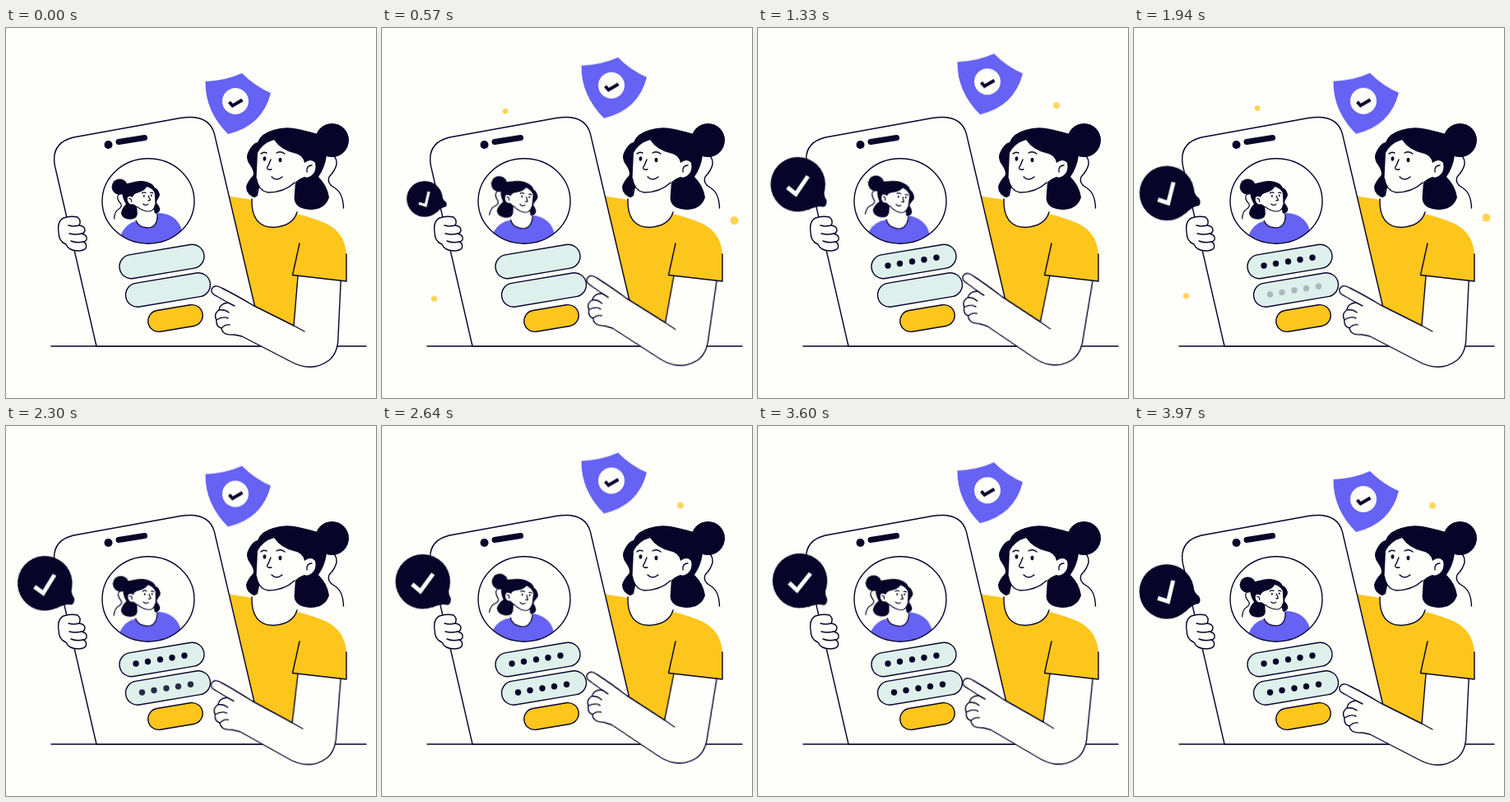
These frames come from a looping animation (450 by 450 pixels, 4000 ms). An HTML page:

```html
<!DOCTYPE html>
<html lang="en">
<head>
<meta charset="utf-8">
<title>Secure sign-in</title>
<style>
  :root {
    --paper: #fefefa; --ink: #060428; --sun: #fcc61c; --violet: #6562f4; --mint: #def0ec;
    --sine: cubic-bezier(.37, 0, .63, 1);
  }
  html, body { margin: 0; width: 100%; height: 100%; overflow: hidden; background: var(--paper); }
  svg { display: block; width: 100%; height: 100%; }
  .line { stroke: var(--ink); stroke-width: var(--weight, 1.4); stroke-linecap: round; stroke-linejoin: round; fill: none; }
  .paper { fill: var(--paper); }
  .ink { fill: var(--ink); }
  .sun { fill: var(--sun); }
  .violet { fill: var(--violet); }

  .shield { animation: lift 1s var(--sine) infinite alternate; }
  .arm { transform-origin: 385px 304px; animation: tap 1s var(--sine) infinite alternate; }
  .avatar { transform-origin: 165px 222px; animation: tilt 1s var(--sine) infinite alternate; }
  .bubble { transform-origin: 75px 220px; animation: bubble 4s var(--sine) infinite; }
  .row1 { animation: row1 4s linear infinite; }
  .row2 { animation: row2 4s linear infinite; }
  .early, .late { animation: early 1.33333s linear infinite; }
  .late { animation-name: late; }

  @keyframes lift { to { transform: translateY(-31.5px); } }
  @keyframes tap { to { transform: rotate(9deg); } }
  @keyframes tilt { to { transform: rotate(13deg); } }
  @keyframes bubble {
    0% { transform: rotate(0deg) scale(0); animation-timing-function: linear; }
    21.75%, 25%, 50%, 75%, 100% { transform: rotate(0deg) scale(1); }
    37.5%, 62.5%, 87.5% { transform: rotate(28deg) scale(1); }
  }
  @keyframes row1 { 0%, 16.7% { opacity: 0; } 33.3%, 100% { opacity: 1; } }
  @keyframes row2 { 0%, 45% { opacity: 0; } 60%, 100% { opacity: 1; } }
  @keyframes early {
    0% { transform: translateY(55px); opacity: 0; }
    15% { opacity: .75; }
    50% { transform: translateY(-9px); opacity: .75; }
    50.01%, 100% { transform: translateY(-9px); opacity: 0; }
  }
  @keyframes late {
    0%, 50% { transform: translateY(63px); opacity: 0; }
    65% { opacity: .7; }
    100% { transform: translateY(-1px); opacity: .7; }
  }
</style>
</head>
<body>
<svg viewBox="0 0 450 450">
  <defs>
    <clipPath id="lens"><ellipse cx="173" cy="210.500" rx="55.500" ry="51.500"/></clipPath>

    <g id="head">
      <circle class="ink" cx="396.500" cy="136.500" r="20.500"/>
      <path class="line" d="M388 152Q403 153 402 166Q400 174 393 181Q390 189 399 194Q410 200 410.500 219"/>
      <path class="ink" d="M325 124Q340 119 356 123Q374 127 382 130L390 155Q388 170 380 181Q391 192 393 206Q388 221 370 221Q352 220 350.500 208L330 180L312 200Q308 208 304 207Q292 203 292 193Q294 186 300 180Q303 176 297 167Q290 158 295 150Q300 140 306 139Q310 128 325 124Z"/>
      <path class="paper" d="M308 194L306 204Q299 207 299 212Q300 242 325 242Q350 242 354 224L350.500 208L352 186Z"/>
      <path class="line" d="M299 208Q298 242 325 242.500Q349 241 354 224"/>
      <path class="paper" d="M326 136Q334 148 350 152Q361 154 363 164Q371 158 376 164Q378 174 372 179Q367 183 363 181Q355 184 352 188Q339 200 319 200.500Q307 198 304.500 183L306 152Q312 140 326 136Z"/>
      <path class="line" d="M304.500 183Q307 198 319 200Q338 200 351 188M366 175Q365 167 372 167"/>
      <ellipse class="ink" cx="314.500" cy="159" rx="1.900" ry="2.800"/>
      <ellipse class="ink" cx="333.500" cy="160.500" rx="1.900" ry="2.800"/>
      <path class="line" d="M310 153Q313 150 317 152M329 152Q334 149 339 153M322 160Q320 166 317.500 170Q318 173 323 172M323 181Q329 187 336 181"/>
    </g>

    <rect id="field" class="line" x="-52" y="-14.500" width="104" height="29" rx="14.500" transform="rotate(-9.500)" style="fill:var(--mint)"/>
    <g id="dots" class="ink">
      <circle cx="-29.500" cy="5" r="3.700"/>
      <circle cx="-15" cy="2.500" r="3.700"/>
      <circle r="3.700"/>
      <circle cx="14.500" cy="-2.300" r="3.700"/>
      <circle cx="29.500" cy="-4.800" r="3.700"/>
    </g>
  </defs>

  <g class="early sun">
    <circle cx="150" cy="101" r="3.300"/>
    <circle cx="428.500" cy="234" r="5"/>
    <circle cx="63.500" cy="329" r="3.600"/>
  </g>
  <circle class="late sun" cx="363" cy="95" r="3.900"/>

  <path class="line" d="M55 387H438"/>

  <g class="shield">
    <path class="violet" d="M242.500 65Q267 64 287 55Q303 71 322 79Q312 119 270 129Q242 101 242.500 65Z"/>
    <circle class="paper" cx="279" cy="89" r="16"/>
    <path class="line" d="M271.500 90L275.500 94.500L287.500 87.500" style="stroke-width:4;stroke-linecap:butt;stroke-linejoin:miter"/>
  </g>

  <!-- woman -->
  <path class="sun" d="M268 204L300 209L354 226Q374 231 390 238Q413 250 414 276V300H356L350 386H290Z"/>
  <use href="#head"/>

  <!-- phone -->
  <path class="line" d="M110 387L59.500 168Q54 140 82 133L212 109.500Q247 104 253.500 129L314 387Z" style="fill:var(--paper)"/>
  <circle class="ink" cx="124.500" cy="142" r="5"/>
  <path class="line" d="M137 138.500L168.500 133.500" style="stroke-width:7"/>

  <g clip-path="url(#lens)">
    <g class="avatar">
      <path class="violet" d="M138 310L139.500 252Q145 238 160 234L186 225Q206 226 213 243L219 310Z"/>
      <use href="#head" transform="translate(324.600 129) scale(-.47 .47)" style="--weight:2.600"/>
    </g>
  </g>
  <ellipse class="line" cx="173" cy="210.500" rx="56" ry="51.700"/>

  <use href="#field" x="189.500" y="284"/>
  <use href="#field" x="197" y="318.500"/>
  <rect class="line" x="-33.500" y="-13" width="67" height="26" rx="13" transform="translate(206 353) rotate(-9.500)" style="fill:var(--sun)"/>
  <g class="row1"><use href="#dots" x="187.500" y="284"/></g>
  <g class="row2"><use href="#dots" x="195" y="319"/></g>

  <!-- hand holding the phone -->
  <path class="line" d="M70 231Q78 228 87 230Q92 234 89 240Q96 241 96 246Q95 250 92 250Q99 252 98 257Q97 260 94 260Q99 262 97 268Q94 271 88 271Q76 271 73 263Q64 260 64 248Q62 235 70 231Z" style="fill:var(--paper)"/>
  <path class="line" d="M89 240Q82 242 76 240M92 250Q84 252 77 250M94 260Q86 262 79 259"/>

  <!-- pointing arm, then the sleeve over it -->
  <g class="arm">
    <path class="line" d="M356 290L350 362L300 337Q280 325 262 316Q253 311 250 318Q249 323 256 326L270 334Q260 335 259 343Q252 348 256 355Q255 363 262 365Q263 374 277 373Q283 374 287 375L345 405Q372 420 393 404Q404 395 404 375L408 290" style="fill:var(--paper)"/>
    <path class="line" d="M350 362L363 369M270 334L278 338M259 343Q266 342 271 346M256 355Q264 350 270 353M262 365Q267 360 272 361"/>
  </g>
  <path class="sun" d="M357 262L348.500 300L414 308V276L404 250Z"/>
  <path class="line" d="M357 262L348.500 300.500L414 308V275"/>

  <g class="bubble">
    <circle class="ink" cx="39.700" cy="201.500" r="33.300"/>
    <path class="ink" d="M72 196Q74 204 79 207Q82 212 79 216Q70 217 62 227Z"/>
    <path d="M29 209.500L41.500 213.500L47.500 188" fill="none" stroke="#fefefa" stroke-width="5"/>
  </g>
</svg>
</body>
</html>
```
